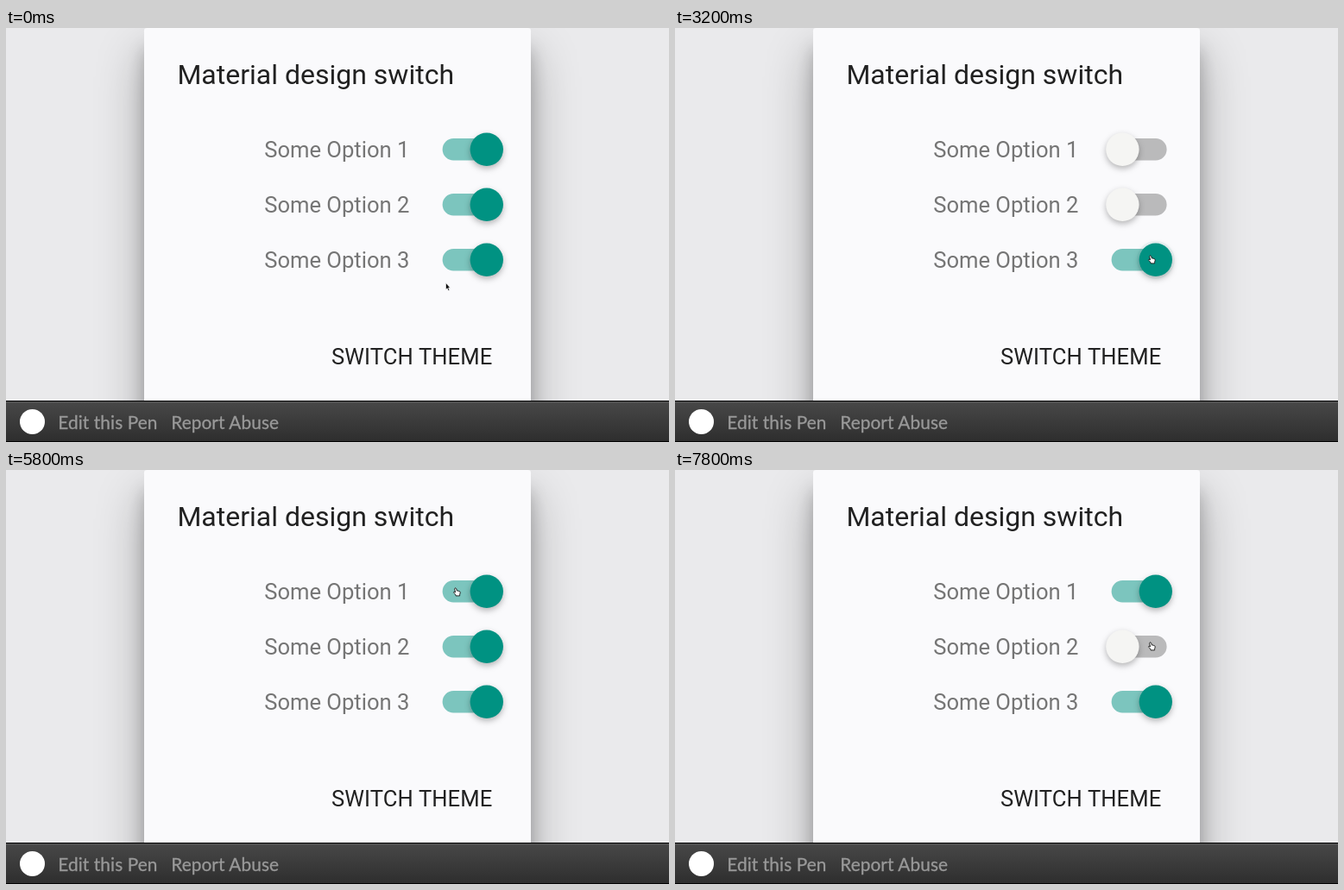
Write an HTML page that moves like this. It is 768 px wide and 480 px high and loops after 8000 ms.

```html
<!DOCTYPE html>
<html lang="en">
<head>
<meta charset="utf-8">
<title>Switches</title>
<style>
  html, body { margin: 0; width: 100%; height: 100%; overflow: hidden; background: #eaeaec; }
  #stage { position: absolute; left: 0; top: 0; width: 768px; height: 480px; overflow: hidden; }
  #card {
    position: absolute; left: 160px; top: 0; width: 448px; height: 470px;
    border-radius: 3.2px; background: #fafafc;
    box-shadow: 0 30px 56px rgba(0, 0, 0, .3), 0 24px 19px rgba(0, 0, 0, .22);
  }
  #bar {
    position: absolute; left: 0; top: 432px; width: 768px; height: 48px; box-sizing: border-box;
    border-top: 1.6px solid #000; border-bottom: 1.6px solid #000;
    background: linear-gradient(#484848, #2e2e2e);
    box-shadow: inset 0 1.6px #555;
  }
  svg { position: absolute; left: 0; top: 0; }
  text { font-family: Roboto, sans-serif; font-size: 25.6px; white-space: pre; }
  .title { font-size: 32px; fill: #212121; }
  .label { fill: #757575; }
  .action { letter-spacing: .1px; fill: #212121; }
  .link {
    font-family: Lato, sans-serif; font-size: 20.8px; letter-spacing: .1px;
    fill: #999; stroke: #999; stroke-width: .3;
  }
  .knob { filter: drop-shadow(0 3.2px 3.6px rgba(0, 0, 0, .28)); }
</style>
</head>
<body>
<div id="stage">
  <div id="card"></div>
  <div id="bar"></div>
  <svg width="768" height="480" viewBox="0 0 768 480">
    <text class="title" x="198.4" y="65">Material design switch</text>
    <g id="ripples"></g>
    <g id="rows"></g>
    <text class="action" x="377" y="389.5">SWITCH THEME</text>
    <circle cx="30.5" cy="456.5" r="14.5" fill="#fff"/>
    <text class="link" x="60.3" y="464.5">Edit this Pen</text>
    <text class="link" x="191.2" y="464.5">Report Abuse</text>
    <g id="cursor">
      <path id="arrow" d="M-2-4.5V3.2L-.3 1.7.9 4.5 2.2 3.9 1 1.3H3Z"
        fill="#000" stroke="#fff" stroke-width=".6"/>
      <path id="hand" d="M-2-4.4Q-.9-5.2-.4-4L.4-1.4Q1.5-1.9 2-1.1 3-1.5 3.4-.6 4.3-.7 4.2.8L3.6 3V4.4H-1V3.2L-3.6.6Q-3.3-.6-2-.2L-1.4.3-2.4-3.4Z"
        fill="#fff" stroke="#111" stroke-width=".9" stroke-linejoin="round"/>
    </g>
  </svg>
</div>
<script>
const LOOP = 8000, STEP = 200;
const FIRST_Y = 140.8, ROW_GAP = 64;
const OFF_X = 518.4, TRAVEL = 38.4, KNOB_R = 19.2, RIPPLE_R = 51.2;
const TEAL = [0, 146, 130, 1], KNOB_OFF = [245, 245, 243, 1];
const TRACK_ON = [0, 146, 130, .5], TRACK_OFF = [0, 0, 0, .26];

const lerp = (a, b, k) => a + (b - a) * k;
const progress = (t, from, to) => Math.min(1, Math.max(0, (t - from) / (to - from)));
const ease = k => k * k * (3 - 2 * k);
const mix = (a, b, k) => `rgba(${a.map((v, i) => lerp(v, b[i], k))})`;
const rowY = i => FIRST_Y + ROW_GAP * i;
const $ = id => document.getElementById(id);

// Pointer x, y, then the times it goes down, goes up and moves on.
const taps = [
  [557, 153.5, 1755, 1880, 2000],
  [553, 205, 2420, 2480, 2600],
  [552, 268.5, 3182, 3280, 3600],
  [524, 205, 4220, 4280, 4400],
  [524, 269.5, 4750, 4764, 5000],
  [522, 141.5, 5420, 5480, 6200],
  [552, 204.5, 7000, 7480, LOOP]
].map(([x, y, down, up, leave]) => ({
  x, y, down, up, leave, arrive: down - 20, row: Math.round((y - FIRST_Y) / ROW_GAP)
}));

const stops = [
  { x: 511.5, y: 300, arrive: 0, leave: 200 },
  { x: 446, y: 219, arrive: 400, leave: 600 },
  ...taps
];

function set(el, attrs) {
  for (const key in attrs) el.setAttribute(key, attrs[key]);
}

function add(parent, name, attrs, text = "") {
  const el = document.createElementNS("http://www.w3.org/2000/svg", name);
  set(el, attrs);
  el.textContent = text;
  return parent.appendChild(el);
}

const rows = [0, 1, 2].map(i => {
  const y = rowY(i);
  add($("rows"), "text", { class: "label", x: 299.2, y: y + 8.7 }, `Some Option ${i + 1}`);
  return {
    ripple: add($("ripples"), "circle", { cy: y, fill: mix(TEAL, TEAL, 0) }),
    track: add($("rows"), "rect", { x: 505.6, y: y - 12.8, width: 64, height: 25.6, rx: 12.8 }),
    knob: add($("rows"), "circle", { class: "knob", cy: y, r: KNOB_R })
  };
});

function drawRow({ ripple, track, knob }, i, t) {
  let on = 1, target = 1, r = 0, opacity = 0;
  for (const { row, down, up } of taps) {
    if (row !== i || t < down) continue;
    const grow = progress(Math.min(t, up), down, down + 200);
    r = lerp(KNOB_R, RIPPLE_R, grow);
    opacity = .2 * Math.sqrt(grow) * (1 - progress(t, up, up + 60));
    if (t >= up) {
      on = lerp(target, 1 - target, ease(progress(t, up, up + 270)));
      target = 1 - target;
    }
  }
  const cx = OFF_X + TRAVEL * on;
  set(knob, { cx, fill: mix(KNOB_OFF, TEAL, on) });
  set(track, { fill: mix(TRACK_OFF, TRACK_ON, on) });
  set(ripple, { cx, r, opacity });
}

function drawCursor(t) {
  const n = stops.findIndex(s => s.leave > t);
  const to = stops[n], from = stops[n - 1] || to;
  const k = ease(progress(t, from.leave, to.arrive));
  const x = lerp(from.x, to.x, k), y = lerp(from.y, to.y, k);
  const over = x > 499 && x < 577 && rows.some((_, i) => Math.abs(y - rowY(i)) < KNOB_R);
  set($("cursor"), { transform: `translate(${x} ${y})` });
  $("hand").style.display = over ? "" : "none";
  $("arrow").style.display = over ? "none" : "";
}

const start = performance.now();
function tick() {
  const t = Math.floor(((performance.now() - start) % LOOP) / STEP) * STEP;
  rows.forEach((row, i) => drawRow(row, i, t));
  drawCursor(t);
  requestAnimationFrame(tick);
}
tick();
</script>
</body>
</html>
```
